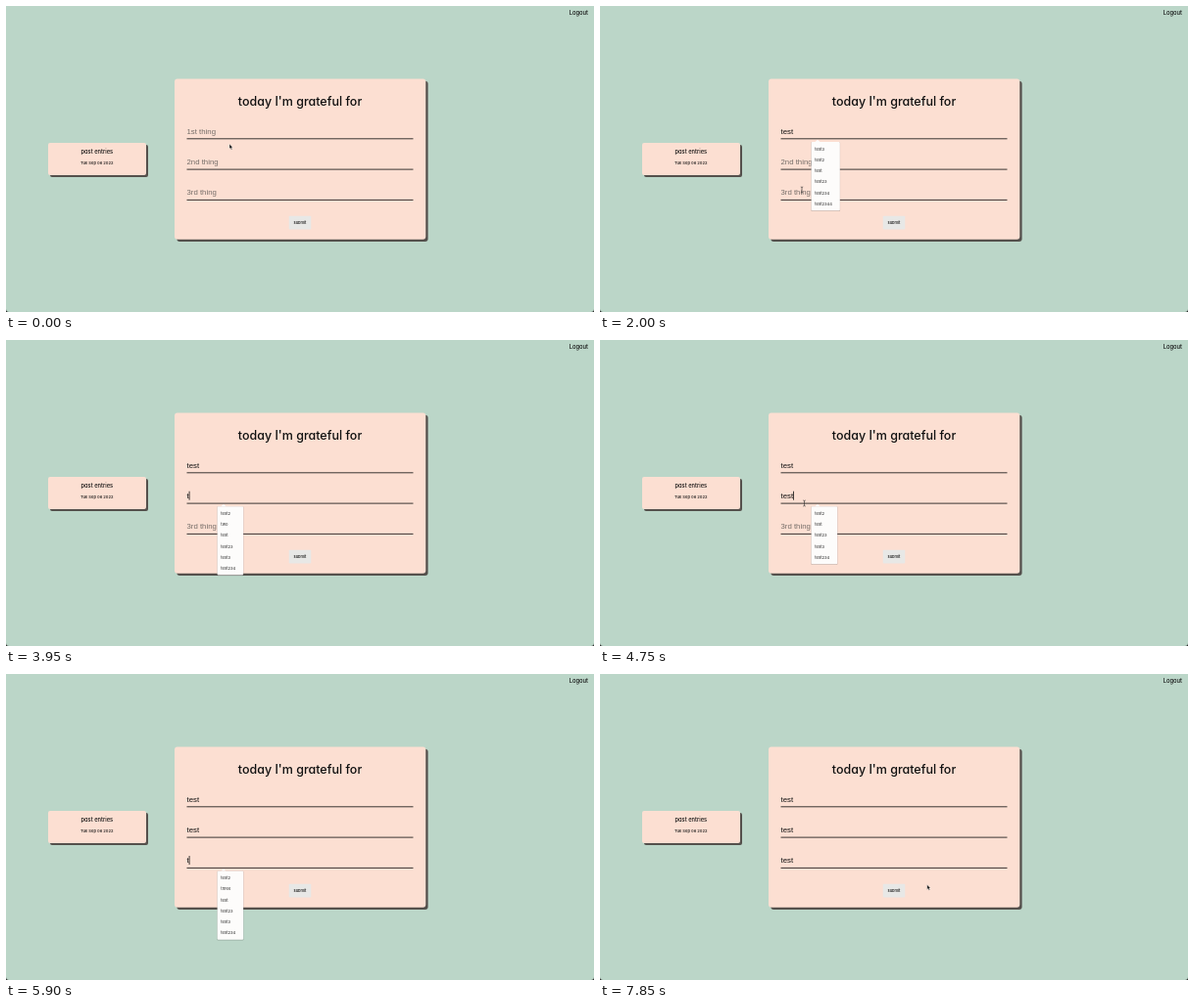
An HTML page that plays this animation: 600 by 313 pixels, repeating every 8 s.

```html
<!DOCTYPE html>
<html lang="en">
<head>
<meta charset="utf-8">
<title>Gratitude journal</title>
<style>
  html, body { margin: 0; width: 100%; height: 100%; overflow: hidden; background: #bbd6c8; }
  svg { display: block; width: 100%; height: 100%; }
  text { font-family: Inter, Roboto, sans-serif; font-weight: 500; font-feature-settings: "cv11"; fill: #111; }
  .mid { text-anchor: middle; }
  .input { font: 7.8px "Liberation Sans", Arial, sans-serif; }
  .option { font-size: 4.1px; font-weight: 400; font-feature-settings: normal; fill: #222; }
</style>
</head>
<body>
<svg id="stage" viewBox="0 0 600 313">
  <rect width="600" height="313" fill="#bbd6c8"/>
  <path d="M0 310Q0 313 3 313H0ZM600 310Q600 313 597 313H600Z" fill="#222"/>
  <text x="584.3" y="8.5" class="mid" font-size="5.8">Logout</text>

  <rect x="45" y="142" width="100" height="33" rx="2" fill="#54504c"/>
  <rect x="43" y="140" width="100" height="33" rx="2" fill="#fcdfd2"/>
  <text x="92.8" y="151" class="mid" font-size="5.75">past entries</text>
  <text x="92.8" y="161.5" class="mid" font-size="4.1">Tue Sep 06 2022</text>

  <rect x="174.3" y="76.8" width="256.3" height="164.2" rx="3" fill="#54504c"/>
  <rect x="172" y="74.5" width="256.3" height="164.2" rx="3" fill="#fcdfd2"/>
  <text x="300" y="102" class="mid" font-size="12.5">today I'm grateful for</text>
  <g id="fields"></g>
  <rect x="288.7" y="214.8" width="22.6" height="13.8" rx="1" fill="#e8e8e6"/>
  <text x="300" y="223" class="mid" font-size="4">submit</text>

  <rect id="caret" width="0.8" height="9" fill="#111"/>
  <g id="menu">
    <rect id="menuShade" x="215.3" rx="1" fill="#000" opacity=".2"/>
    <path id="menuTip" d="M219.5 0L222 -2.2L224.5 0Z" fill="#fdfcfb"/>
    <rect id="menuBox" x="215.6" rx="1" fill="#fdfcfb"/>
    <g id="options"></g>
  </g>
  <path id="arrow" d="M0 0V4.8L1.1 3.8L1.9 5.6L2.8 5.2L2 3.5H3.4Z" fill="#111" stroke="#fff" stroke-width=".35"/>
  <path id="beam" d="M-1.2 -3Q0 -3 0 -2.2Q0 -3 1.2 -3M0 -2.2V2.2M-1.2 3Q0 3 0 2.2Q0 3 1.2 3" fill="none" stroke="#333" stroke-width=".65"/>
</svg>
<script>
const LOOP = 8000, STEP = 50, LEFT = 184.5;
const lines = [135.8, 167.1, 198.4];
const hints = ["1st thing", "2nd thing", "3rd thing"];
const $ = id => document.getElementById(id);

function add(parent, tag, attrs) {
  const el = document.createElementNS("http://www.w3.org/2000/svg", tag);
  return parent.appendChild(set(el, attrs));
}
function set(el, attrs) {
  for (const key in attrs) el.setAttribute(key, attrs[key]);
  return el;
}
function show(el, on) { el.style.display = on ? "" : "none"; }

const inputs = lines.map(y => {
  add($("fields"), "rect", { x: LEFT, y: y - .5, width: 231, height: 1, fill: "#3a3532" });
  return add($("fields"), "text", { x: LEFT, y: y - 5.1, class: "input" });
});
const options = Array.from({ length: 6 }, () => add($("options"), "text", { x: 219.3, class: "option" }));

// time, focused field (-1 for none), its value, suggestions
const words = list => list.split(" ");
const listA = words("test3 test2 test test23 test234 test2344");
const listB = words("test2 test test23 test3 test234");
const events = [
  [0, -1, "", []],
  [350, 0, "", words("test3 test2 one test test23 test234")],
  [900, 0, "t", listA],
  [1050, 0, "te", listA],
  [1200, 0, "tes", listA],
  [1400, 0, "test", listA],
  [2800, 1, "", words("test2 2 two test hi test3")],
  [3950, 1, "t", words("test2 two test test23 test3 test234")],
  [4100, 1, "te", listB],
  [4300, 1, "tes", listB],
  [4550, 1, "test", listB],
  [5250, -1, "", []],
  [5350, 2, "", words("test2 3 three test test23 test3")],
  [5900, 2, "t", words("test2 three test test23 test3 test234")],
  [6050, 2, "te", listB],
  [6200, 2, "tes", listB],
  [6550, 2, "test", listB],
  [7850, -1, "", []]
];

// pointer strokes of [time, x, y]; the pointer hides while typing
const strokes = [
  { until: 900, path: [[0, 228, 141.3], [350, 205, 129], [550, 203, 128]] },
  { from: 1450, until: 3950, path: [[1450, 203, 128], [1700, 210, 146], [2000, 206, 188], [2250, 206, 158],
    [2500, 206, 156], [3300, 206, 156], [3500, 205, 157], [3750, 205, 157], [3800, 206, 157]] },
  { from: 4600, until: 5900, path: [[4600, 207, 158], [4750, 208.5, 167], [5100, 206, 189]] },
  { from: 6500, until: LOOP, path: [[6500, 206, 186], [6550, 215, 168], [6600, 213, 188.5],
    [6950, 213, 188.5], [7000, 213, 188.5], [7650, 333.8, 215.6]] }
];

function along(path, t) {
  const next = path.findIndex(p => p[0] > t);
  if (next < 0) return path[path.length - 1].slice(1);
  const a = path[Math.max(next - 1, 0)], b = path[next];
  const u = Math.max(0, (t - a[0]) / (b[0] - a[0]));
  const ease = u * u * (3 - 2 * u);
  return [1, 2].map(i => a[i] + (b[i] - a[i]) * ease);
}

function drawMenu(field, list) {
  show($("menu"), list.length);
  if (!list.length) return;
  const top = lines[field] + 3.2;
  let widest = 0;
  options.forEach((el, i) => {
    el.textContent = list[i] || "";
    set(el, { y: top + 8.5 + i * 11.25 });
    if (list[i]) widest = Math.max(widest, el.getComputedTextLength());
  });
  const width = widest + 11.7, height = 2.7 + list.length * 11.25;
  set($("menuBox"), { y: top, width, height });
  set($("menuShade"), { y: top - .1, width: width + .6, height: height + .9 });
  set($("menuTip"), { transform: `translate(0 ${top})` });
}

function drawPointer(t) {
  const stroke = strokes.find(s => t >= (s.from || 0) && t < s.until);
  const [x, y] = stroke ? along(stroke.path, t) : [0, 0];
  const overField = lines.some(line => y > line - 14 && y < line + 1);
  show($("beam"), stroke && overField);
  show($("arrow"), stroke && !overField);
  for (const id of ["beam", "arrow"]) set($(id), { transform: `translate(${x} ${y})` });
}

function draw(t) {
  const past = events.filter(e => e[0] <= t);
  const [since, focus, value, list] = past[past.length - 1];
  inputs.forEach((el, i) => {
    const entry = past.filter(e => e[1] === i).pop();
    const typed = entry ? entry[2] : "";
    el.textContent = typed || hints[i];
    el.style.fill = typed ? "#111" : "#756d68";
  });
  show($("caret"), focus >= 0 && Math.floor((t - since) / 500) % 2 === 0);
  if (focus >= 0) {
    const offset = value ? inputs[focus].getComputedTextLength() : 0;
    set($("caret"), { x: LEFT + offset, y: lines[focus] - 12.4 });
  }
  drawMenu(focus, list);
  drawPointer(t);
}

const start = performance.now();
function tick() {
  const t = (performance.now() - start) % LOOP;
  draw(Math.floor(t / STEP) * STEP);
  requestAnimationFrame(tick);
}
tick();
</script>
</body>
</html>
```
